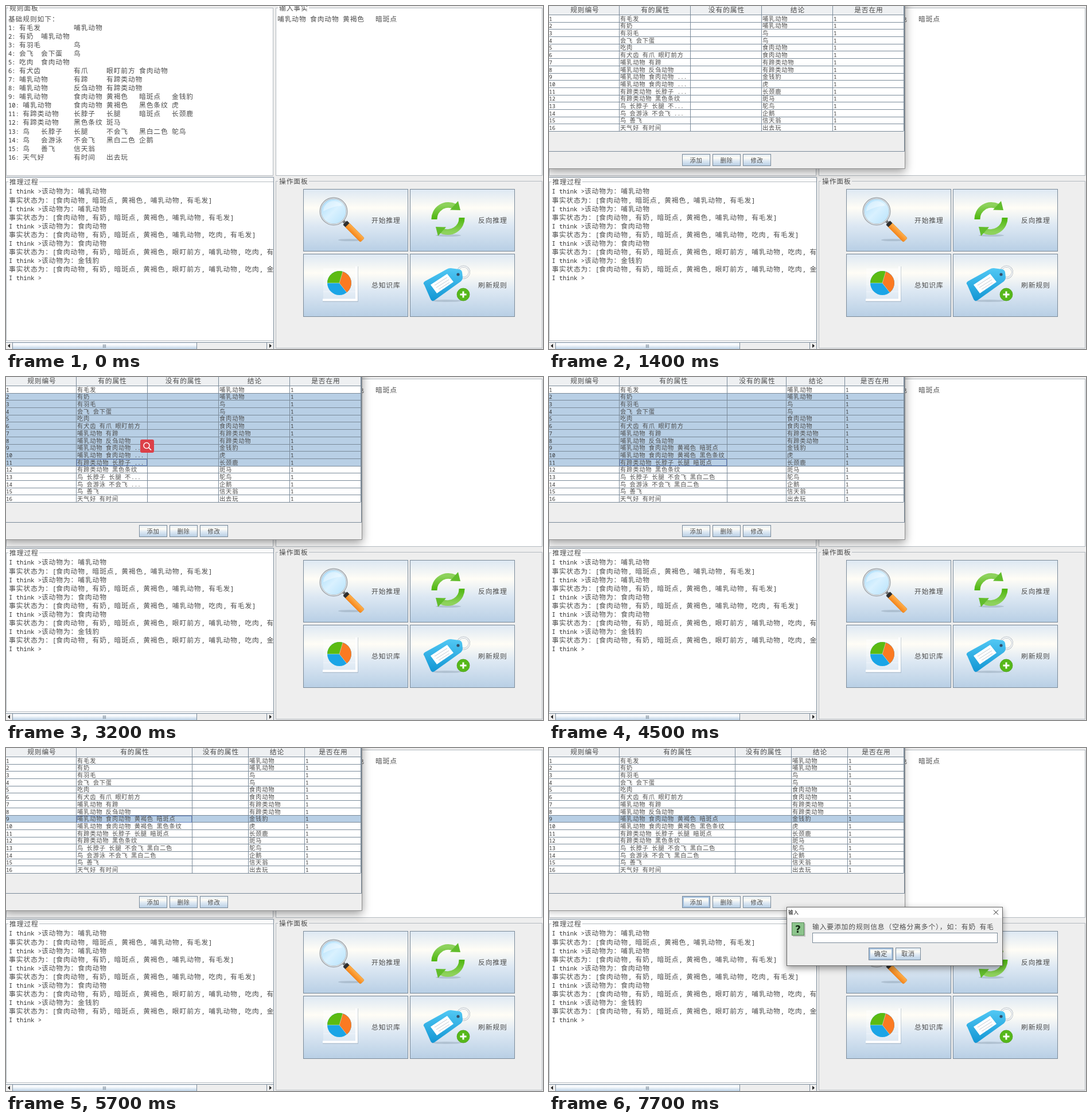
Write an HTML page that moves like this. It is 936 px wide and 598 px high and loops after 8000 ms.

```html
<!DOCTYPE html>
<html lang="zh-CN">
<head>
<meta charset="utf-8">
<title>推理系统</title>
<style>
  html, body { margin: 0; width: 100%; height: 100%; overflow: hidden; background: #eee; }
  svg { display: block; width: 936px; height: 598px; }
  text { font-family: "Noto Sans CJK SC", "Noto Sans CJK", sans-serif; font-weight: 300; fill: #4c4c4c; white-space: pre; letter-spacing: .0753em; }
  .mono { font-family: "Noto Sans Mono", "DejaVu Sans Mono", monospace; font-size: .896em; font-weight: 400; fill: #333; letter-spacing: 0; }
  .line { fill: none; stroke: #7a8a99; }
  .soft { fill: none; stroke: #b4bac0; }
  #window { transform-origin: 310px 125px; }
  #dialog { transform-origin: 602px 328px; }
  #dialog { filter: drop-shadow(0 4px 6px rgba(0, 0, 0, .42)); }
</style>
</head>
<body>
<svg id="stage" viewBox="0 0 936 598">
  <defs>
    <linearGradient id="ocean" x2="0" y2="1">
      <stop stop-color="#dde8f3"/><stop offset=".3" stop-color="#fffdf6"/>
      <stop offset=".58" stop-color="#dde8f3"/><stop offset="1" stop-color="#b8cfe5"/>
    </linearGradient>
    <linearGradient id="thumb" x2="0" y2="1">
      <stop stop-color="#dde8f3"/><stop offset=".3" stop-color="#fff"/><stop offset="1" stop-color="#b8cfe5"/>
    </linearGradient>
    <linearGradient id="lens" x2="1" y2="1">
      <stop stop-color="#a5daf9"/><stop offset=".5" stop-color="#d9f1ff"/><stop offset="1" stop-color="#b4e1fb"/>
    </linearGradient>
    <linearGradient id="orange" x2="0" y2="1">
      <stop stop-color="#ffb04c"/><stop offset="1" stop-color="#f5841a"/>
    </linearGradient>
    <linearGradient id="green" x2="0" y2="1">
      <stop stop-color="#8ed25c"/><stop offset="1" stop-color="#4cb50c"/>
    </linearGradient>
    <linearGradient id="blue" x2="0" y2="1">
      <stop stop-color="#52c8f4"/><stop offset="1" stop-color="#1296d4"/>
    </linearGradient>
    <clipPath id="logClip"><rect y="299" width="466" height="286"/></clipPath>
  </defs>
  <g id="main"></g>
  <g id="window"></g>
  <g id="dialog"></g>
</svg>
<script>
const FULL = 12.667, SMALL = 11.08, LOOP = 8000;
const el = id => document.getElementById(id);
const halves = s => [...s].reduce((n, c) => n + (c < '\x7f' ? 1 : 2), 0);
const rect = (x, y, w, h, attrs = '') => `<rect x="${x}" y="${y}" width="${w}" height="${h}" ${attrs}/>`;
const box = (x, y, w, h, fill, cls = 'line') =>
  rect(x + .5, y + .5, w - 1, h - 1, `class="${cls}" style="fill:${fill}"`);

// y is the middle of the line; glyphs are a little smaller than their cell, latin takes half a cell
function label(s, x, y, cell = FULL, attrs = '') {
  const body = s.replace(/[ -~]+/g, m => `<tspan class="mono">${m.replace('>', '&gt;')}</tspan>`);
  return `<text x="${x}" y="${(y + cell * .35).toFixed(2)}" font-size="${cell * .93}" ${attrs}>${body}</text>`;
}
const centered = (s, x, y, cell) => label(s, x - halves(s) * (cell || FULL) / 4, y, cell);

// Tab stops sit every nine half cells
function tabbed(s, x, y) {
  let at = 0;
  return s.split('\t').map(part => {
    const out = label(part, x + at * FULL / 2, y);
    at = (Math.floor((at + halves(part)) / 9) + 1) * 9;
    return out;
  }).join('');
}

const titled = (x, y, w, h, title, fill) =>
  box(x, y, w, h, fill, 'soft') + rect(x + 4, y - 5, 54, 12, `fill="${fill}"`) + label(title, x + 6, y + 1);

const button = (x, y, w, h) => box(x, y, w, h, 'url(#ocean)');
const hover = (x, y, w, h, id) =>
  rect(x + 2, y + 2, w - 4, h - 4, `id="${id}" fill="none" stroke="#a3bfdd" stroke-width="2"`);

const rules = `有毛发|哺乳动物
有奶|哺乳动物
有羽毛|鸟
会飞 会下蛋|鸟
吃肉|食肉动物
有犬齿 有爪 眼盯前方|食肉动物
哺乳动物 有蹄|有蹄类动物
哺乳动物 反刍动物|有蹄类动物
哺乳动物 食肉动物 黄褐色 暗斑点|金钱豹
哺乳动物 食肉动物 黄褐色 黑色条纹|虎
有蹄类动物 长脖子 长腿 暗斑点|长颈鹿
有蹄类动物 黑色条纹|斑马
鸟 长脖子 长腿 不会飞 黑白二色|鸵鸟
鸟 会游泳 不会飞 黑白二色|企鹅
鸟 善飞|信天翁
天气好 有时间|出去玩`.split('\n').map(r => r.split('|'));

const facts = [
  ['哺乳动物', '食肉动物, 暗斑点, 黄褐色, 哺乳动物, 有毛发'],
  ['哺乳动物', '食肉动物, 有奶, 暗斑点, 黄褐色, 哺乳动物, 有毛发'],
  ['食肉动物', '食肉动物, 有奶, 暗斑点, 黄褐色, 哺乳动物, 吃肉, 有毛发'],
  ['食肉动物', '食肉动物, 有奶, 暗斑点, 黄褐色, 眼盯前方, 哺乳动物, 吃肉, 有毛发'],
  ['金钱豹', '食肉动物, 有奶, 暗斑点, 黄褐色, 眼盯前方, 哺乳动物, 吃肉, 金钱豹']
];
const log = facts.flatMap(([kind, list]) => ['I think >该动物为：' + kind, `事实状态为：[${list}]`]);
log.push('I think >');

const shadow = (x, y, rx) => `<ellipse cx="${x}" cy="${y}" rx="${rx}" ry="2" fill="#6f8193" opacity=".3"/>`;

const magnifier = shadow(599, 408, 20) + `
  <g transform="rotate(45 571 358)">
    ${rect(594, 355.5, 8, 5, 'fill="#777"')}
    ${rect(603, 353, 39, 10, 'rx="2.5" fill="url(#orange)" stroke="#e08a28" stroke-width=".6"')}
    ${rect(599, 353, 6, 10, 'rx="1" fill="#2f2f2f"')}
  </g>
  <circle cx="571" cy="358" r="23" fill="url(#lens)" stroke="#989ea4" stroke-width="3"/>
  <circle cx="571" cy="358" r="22.6" fill="none" stroke="#dfe4e8" stroke-width="1.4"/>
  <path d="M553 358a18 18 0 0 1 33-10q-14 0-33 10z" fill="#fff" opacity=".4"/>`;

const halfTurn = `<path d="M746.5 372A24.5 24.5 0 0 1 782 349.5" fill="none" stroke="url(#green)" stroke-width="10"/>
  <path d="M788 340L792 356 774 355.5z" fill="#62bd2c"/>`;
const cycle = shadow(771, 400, 22) + halfTurn + `<g transform="rotate(180 770.5 370.5)">${halfTurn}</g>`;

const pie = `
  <path d="M552 514.5H612.5V454" fill="none" stroke="#8fa0b0" stroke-width="3" opacity=".45"/>
  <path d="M552 512.5H611V454" fill="none" stroke="#fff" stroke-width="4"/>
  <circle cx="581" cy="483" r="21" fill="#1ba5e6"/>
  <path d="M581 483H560A21 21 0 0 1 587 462.9z" fill="#5cbb12"/>
  <path d="M581 483L587 462.9A21 21 0 0 1 594 499.5z" fill="#fb7a22"/>
  <path d="M560 483H581L587 462.9M581 483L594 499.5" fill="none" stroke="#fff" stroke-width=".7" opacity=".6"/>`;

const tag = shadow(768, 514, 26) + `
  <circle cx="797.5" cy="464" r="10" fill="none" stroke="#9aa4ad" stroke-width="3"/>
  <circle cx="797.5" cy="464" r="10" fill="none" stroke="#f3f5f7" stroke-width="2"/>
  <path d="M729 486Q726 483 730 480L768 459Q771 457 775 457L790 459Q794 460 795 464L796 473Q796 477 793 480L747 513Q742 516 740 511z" fill="url(#blue)"/>
  <path d="M740 486L769 467 780 481 751 501z" fill="#fff"/>
  <path d="M747 487L769 473M750 491L772 477M754 494L773 482" stroke="#c3ccd4" stroke-width="1"/>
  <circle cx="788" cy="468" r="2.6" fill="#35506b"/>
  <circle cx="797" cy="503" r="11" fill="#56b81a" stroke="#4a9a18" stroke-width=".7"/>
  <path d="M791.5 503H802.5M797 497.5V508.5" stroke="#fff" stroke-width="3"/>`;

el('main').innerHTML =
  rect(0, 0, 936, 598, 'fill="#eee"') +
  titled(0, 3, 466, 293, '规则面板', '#fff') +
  label('基础规则如下：', 4, 22.5) +
  rules.map(([has, result], i) =>
    tabbed(`${i + 1}: ${has.replace(/ /g, '\t')}\t${result}`, 4, 37.5 + i * 15.05)).join('') +
  titled(470, 3, 465, 293, '输入事实', '#fff') +
  tabbed('哺乳动物\t食肉动物\t黄褐色\t暗斑点', 473, 22.5) +
  rect(0, 299, 467, 287, 'fill="#fff"') + '<path class="line" d="M0 298.5H466.5V598"/>' +
  // The log is wider than its view, so its right edge is scrolled away
  `<g clip-path="url(#logClip)">${titled(0, 306, 680, 278, '推理过程', '#fff')}${
    log.map((s, i) => label(s, 5, 323 + i * 15.08)).join('')}</g>` +
  box(-1, 586, 468, 13, '#eee') + box(-1, 586, 13, 13, '#eee') + box(454, 586, 13, 13, '#eee') +
  box(11, 586, 322, 13, 'url(#thumb)') +
  '<path d="M7 589V596L3 592.5zM459 589V596L463 592.5z" fill="#222"/>' +
  '<path class="line" d="M169.5 590V596M171.5 590V596M173.5 590V596"/>' +
  titled(470, 305, 465, 292, '操作面板', '#eee') +
  button(518, 319, 183, 109) + button(704, 319, 183, 109) +
  button(518, 432, 183, 110) + button(704, 432, 183, 110) +
  rect(553, 457, 58, 55, 'fill="#fff" opacity=".25"') +
  '<path d="M553 459H611M553 472H611M553 485H611M553 498H611" stroke="#fff" opacity=".4"/>' +
  hover(518, 319, 183, 109, 'hoverStart') + hover(518, 432, 183, 110, 'hoverBase') +
  `<g id="pressBase">${box(518, 432, 183, 110, '#b8cfe5')}${rect(530.5, 434.5, 157, 104, 'class="line" stroke-opacity=".45"')}</g>` +
  magnifier + cycle + pie + tag +
  label('开始推理', 637, 373.5) + label('反向推理', 823, 373.5) +
  label('总知识库', 637, 487) + label('刷新规则', 823, 487);

el('window').innerHTML =
  rect(-4, -30, 625, 313.5, 'fill="#eee"') +
  '<path d="M0 283.5H620.5V0" fill="none" stroke="#8c8c8c"/>' +
  '<path class="line" d="M0 253.5H619.5V0"/>' +
  '<g id="table"></g>' +
  button(232, 258, 49, 21) + button(285, 258, 49, 21) + button(338, 258, 49, 21) +
  `<g id="pressAdd">${box(232, 258, 49, 21, '#b8cfe5')}</g>` + hover(232, 258, 49, 21, 'hoverAdd') +
  centered('添加', 256.5, 269, SMALL) + centered('删除', 309.5, 269, SMALL) + centered('修改', 362.5, 269, SMALL) +
  `<g id="lookup">${rect(234, 109, 24, 23, 'rx="3" fill="#dc4049"')}
    <circle cx="245" cy="119.5" r="5" fill="none" stroke="#fff" stroke-width="1.5"/>
    <path d="M248.7 123.2L253 127.5" stroke="#fff" stroke-width="1.7"/></g>`;

el('dialog').innerHTML =
  box(414, 277, 377, 103, '#eee') + rect(415, 278, 375, 18, 'fill="#fff"') +
  rect(414.5, 277.5, 376, 102, 'fill="none" stroke="#666"') +
  label('输入', 417, 286.5, 9.3, 'style="fill:#000;font-weight:400"') +
  '<path d="M775 282.5L783 290.5M783 282.5L775 290.5" stroke="#222"/>' +
  rect(425, 306, 22, 23, 'fill="#aaa" opacity=".6"') +
  rect(423.5, 304.5, 21, 22, 'fill="#8cc48c" stroke="#5a8a5a"') +
  '<text x="434" y="322" text-anchor="middle" style="font:bold 17px \'DejaVu Sans\',sans-serif;fill:#142814;letter-spacing:0">?</text>' +
  label('输入要添加的规则信息（空格分离多个），如：有奶 有毛', 459, 312) +
  box(459, 322, 323, 18, '#fff') + rect(461, 323, 1, 16, 'id="caret" fill="#222"') +
  button(557, 348, 43, 22) + hover(557, 348, 43, 22, 'hoverOk') + button(604, 348, 44, 22) +
  centered('确定', 578.5, 359, 11.8) + centered('取消', 626, 359, 11.8);

const rowTop = i => Math.round(15 + i * 12.69);

function clipText(s, width) {
  const fits = t => halves(t) * SMALL / 2 <= width;
  if (fits(s)) return s;
  while (!fits(s + '...')) s = s.slice(0, -1);
  return s + '...';
}

let tableKey = '';
function drawTable(edge, first, last, lead) {
  const key = [edge, first, last, lead].join();
  if (key === tableKey) return;
  tableKey = key;
  const rest = (618 - edge) / 3;
  const cols = [0, 122, edge, edge + rest, edge + 2 * rest, 618].map(Math.round);
  let out = rect(0, 0, 618, 15, 'fill="#eef0f2"') + rect(0, 15, 618, 203, 'fill="#fff"');
  if (first) out += rect(0, rowTop(first - 1), 618, rowTop(last) - rowTop(first - 1), 'fill="#b8cfe5"');
  out += `<path class="line" d="${cols.slice(1).map(x => `M${x + .5} 0V218`).join('')}${
    [...Array(17).keys()].map(i => `M0 ${rowTop(i) + .5}H618`).join('')}"/>`;
  if (lead) out += rect(123.5, rowTop(lead - 1) + 1.5, edge - 124, 11, 'fill="none" stroke="#6382bf"');
  ['规则编号', '有的属性', '没有的属性', '结论', '是否在用'].forEach((s, i) => {
    out += centered(s, (cols[i] + cols[i + 1]) / 2 + 1.5, 6.5);
  });
  rules.forEach(([has, result], i) => {
    const y = 21.8 + i * 12.69;
    out += label(String(i + 1), 0, y, SMALL) + label(clipText(has, edge - 126), 124, y, SMALL) +
      label(result, cols[3] + 2, y, SMALL) + label('1', cols[4] + 2, y, SMALL);
  });
  el('table').innerHTML = out;
}

const show = (id, on) => { el(id).style.display = on ? '' : 'none'; };

// Windows fade and grow in over a few hard steps
function popIn(id, t, start, steps) {
  const u = Math.min(1, (Math.floor((t - start) / 100) + 1) / steps);
  show(id, u > 0);
  el(id).style.opacity = u;
  el(id).style.transform = u < 1 ? `scale(${1 - .08 * (1 - u) ** 2})` : 'none';
}

function render(t) {
  const within = (a, b) => t >= a && t < b;
  show('hoverStart', within(300, 500));
  show('hoverBase', within(500, 900) || within(1100, 1200));
  show('pressBase', within(900, 1100));

  popIn('window', t, 1100, 4);
  el('window').style.filter = t < 7200
    ? 'drop-shadow(0 5px 8px rgba(0,0,0,.4))' : 'drop-shadow(0 2px 6px rgba(0,0,0,.25))';
  const drag = Math.max(0, Math.min(9, Math.floor((t - 4100) / 100) + 1));
  const edge = Math.round(324 - 78 * (1 - drag / 9) ** 2.12);
  if (t < 2600) drawTable(edge, 0, 0, 0);
  else if (t < 5700) {
    const last = 2 + 3 * Math.min(3, Math.floor((t - 2600) / 100));
    drawTable(edge, 2, last, last);
  } else drawTable(edge, 9, 9, t < 7000 ? 9 : 0);

  show('lookup', within(2900, 3800));
  el('lookup').style.opacity = t < 3200 ? .85 : t < 3500 ? 1 : .1;
  show('hoverAdd', within(6700, 7000) || t >= 7200);
  show('pressAdd', within(7000, 7200));
  popIn('dialog', t, 7200, 3);
  show('caret', t < 7700);
}

function tick() {
  render(performance.now() % LOOP);
  requestAnimationFrame(tick);
}
tick();
</script>
</body>
</html>
```
